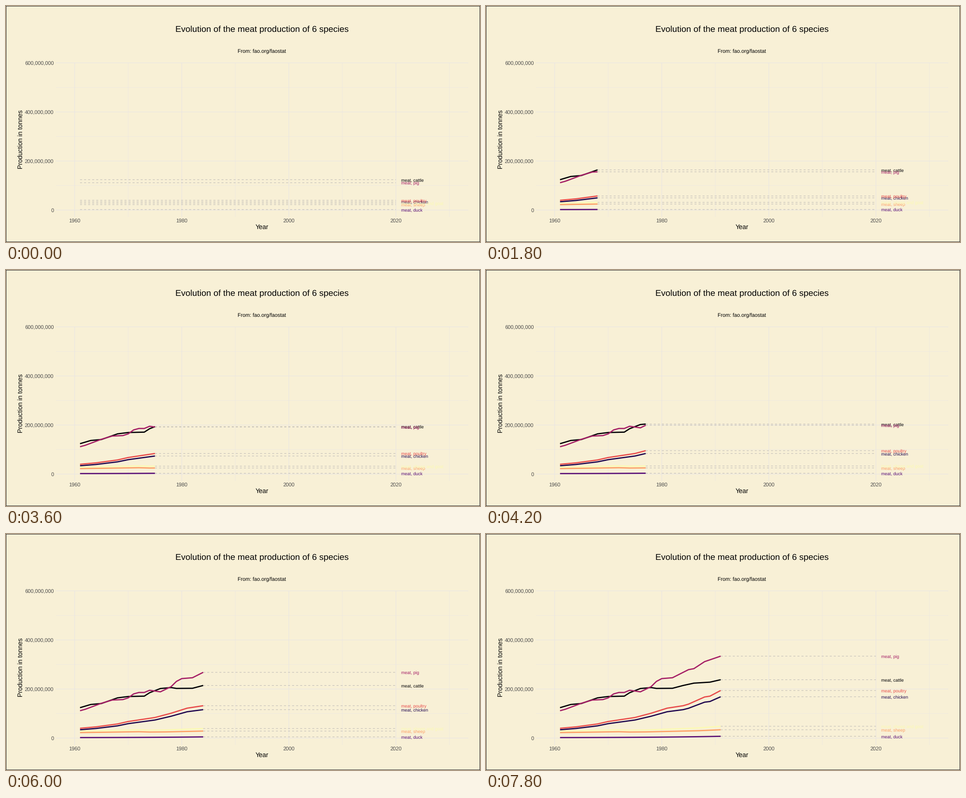
A matplotlib script for the animation above (8000 ms loop, 1058 by 529 pixels).

```python
import numpy as np
import matplotlib.pyplot as plt
from matplotlib.animation import FuncAnimation
from matplotlib.patches import Rectangle

W, H, DPI = 1058, 529, 64
FRAMES, INTERVAL = 40, 200
PT = 72 / DPI  # points per pixel

BACK, GRID, TICK, EDGE = "#f8f0d6", "#e9e6e4", "#4d4d4d", "#333333"
LEFT, RIGHT, TOP, BOTTOM = 111.5, 1032, 127, 473

plt.rcParams["font.family"] = "Liberation Sans"
plt.rcParams["text.hinting"] = "none"

YEARS = np.arange(1961, 1992)
SPAN = (YEARS - 1961) / 30

# Each year lands on a whole frame; frames between two years interpolate.
KEYS = np.floor((YEARS - 1961) * 74 / 57 + 0.5)


def trend(points):
    """Yearly values through a few turning points {year - 1900: value}."""
    return np.interp(YEARS - 1900, list(points), list(points.values()))


# Production in million tonnes.
cattle = trend({61: 124, 63: 137, 65: 141, 68: 164, 70: 169.5, 73: 171,
                74: 185, 76: 202, 78: 206, 79: 202.5, 82: 203, 84: 214.5,
                86: 224, 89: 228, 91: 238})
pig = trend({61: 111.6, 62: 117.6, 65: 142, 67: 155, 69: 157, 70: 164,
             71: 180, 72: 186, 73: 186, 74: 195, 76: 188.5, 78: 209.5,
             79: 231, 80: 242.5, 82: 246, 85: 279, 86: 283, 88: 311.6,
             91: 334})
poultry = trend({61: 40, 64: 45.8, 68: 57.6, 70: 67.6, 75: 84, 78: 101.3,
                 81: 122, 84: 132, 85: 138.5, 88: 167.6, 89: 171, 91: 194})
sheep = trend({61: 22.4, 72: 26, 74: 24.7, 77: 25.2, 87: 30.2, 91: 34})
chicken = poultry * (0.85 + 0.03 * np.sin(2.48 * SPAN))
sheep_goat = sheep * (1.27 + 0.15 * SPAN ** 2)
duck = 2.2 * 3.36 ** SPAN ** 1.5

SERIES = [
    ("cattle", "#000004", cattle),
    ("chicken", "#20084f", chicken),
    ("duck", "#5a0f74", duck),
    ("pig", "#a51f66", pig),
    ("poultry", "#e84c4b", poultry),
    ("sheep", "#fda065", sheep),
    ("sheep and goat", "#fcfab4", sheep_goat),
]


def px(year):
    return 153.3 + (np.asarray(year) - 1960) * 11.95


def py(value):
    return 457.5 - 0.55 * np.asarray(value)


fig = plt.figure(figsize=(W / DPI, H / DPI), dpi=DPI, facecolor=EDGE)
ax = fig.add_axes([0, 0, 1, 1])
ax.set_xlim(0, W)
ax.set_ylim(H, 0)
ax.axis("off")


def line(xs, ys, color, width, **kw):
    return ax.plot(xs, ys, color=color, lw=width * PT, snap=False,
                   solid_capstyle="butt", **kw)[0]


def text(x, y, s, size, color="black", ha="center", **kw):
    return ax.text(x, y, s, fontsize=size * PT, color=color, ha=ha,
                   va="baseline", **kw)


def draw_frame():
    # The dark figure shows as a one-pixel border.
    ax.add_patch(Rectangle((1, 1), W - 2, H - 2, fc=BACK, lw=0, snap=False))
    for year in range(1960, 2031, 10):
        major = year % 20 == 0
        line([px(year)] * 2, [TOP, BOTTOM], GRID, 1.1 if major else 0.6)
        if major:
            text(px(year), 485.2, str(year), 11.6, TICK)
    for value in range(0, 601, 100):
        major = value % 200 == 0
        y = py(value)
        line([LEFT, RIGHT], [y, y], GRID, 1.1 if major else 0.6)
        if major:
            text(106.6, y + 4.1, f"{value * 1_000_000:,}", 11.6, TICK,
                 ha="right")
    text(571.3, 58.4, "Evolution of the meat production of 6 species", 19.37)
    text(571, 106, "From: fao.org/faostat", 11.69)
    text(571.5, 500.3, "Year", 14.5)
    text(38, 298.5, "Production in tonnes", 14.5, rotation=90,
         rotation_mode="anchor")


class Species:
    def __init__(self, name, color, values):
        self.values = values
        self.dash = line([], [], "#bebab6", 1.1, zorder=3,
                         dashes=(4.1, 4.1), dash_capstyle="butt")
        self.path = line([], [], color, 2.8, zorder=4,
                         solid_joinstyle="round")
        self.label = text(px(2021) - 0.3, 0, f"meat, {name}", 9.7, color,
                          ha="left", zorder=5)

    def show(self, year):
        past = YEARS < year
        x, y = px(year), py(np.interp(year, YEARS, self.values))
        self.path.set_data(np.append(px(YEARS[past]), x),
                           np.append(py(self.values[past]), y))
        self.dash.set_data([x, px(2020)], [y, y])
        self.label.set_y(y + 4)


draw_frame()
species = [Species(*row) for row in SERIES]


def update(frame):
    year = np.interp(frame, KEYS, YEARS)
    for item in species:
        item.show(year)
    return []


anim = FuncAnimation(fig, update, frames=FRAMES, interval=INTERVAL,
                     init_func=lambda: update(0), repeat=True,
                     repeat_delay=0, blit=False)
plt.show()
```
